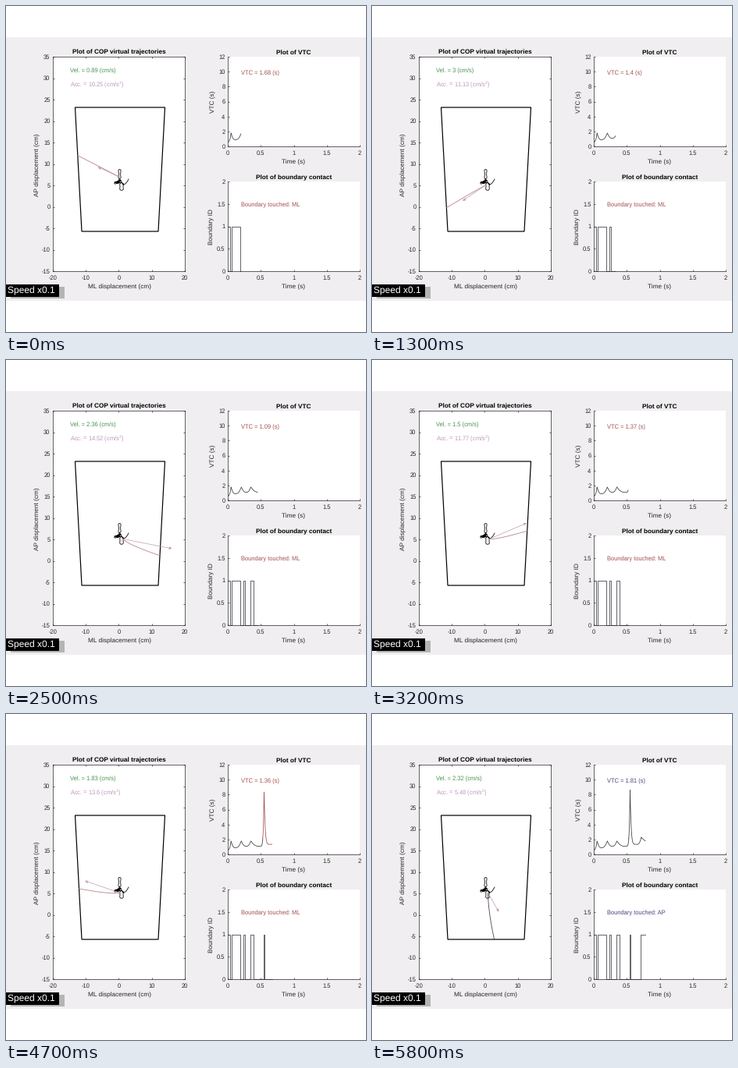
A matplotlib script for the animation above (5.9 s loop, 461 px wide and 418 px high).

```python
import numpy as np
import matplotlib.pyplot as plt
from matplotlib.animation import FuncAnimation
from matplotlib.patches import Polygon, Rectangle

W, H, DPI = 461, 418, 64
PT = 72 / DPI  # points per pixel
FRAMES, T0, DT = 59, 0.2, 0.01
INK, DARK, RED, BLUE = "#262626", "#404048", "#a4504f", "#46467c"
GREEN, PURPLE, ROSE = "#4b9152", "#bd9abb", "#b67f84"

plt.rcParams.update({
    "font.family": "Liberation Sans",
    "mathtext.default": "regular",
    "text.hinting": "none",
    "axes.unicode_minus": False,
    "axes.edgecolor": INK,
    "axes.linewidth": 0.7 * PT,
    "lines.linewidth": 0.8 * PT,
})

fig = plt.figure(figsize=(W / DPI, H / DPI), dpi=DPI, facecolor="white")


def pixel_axes(zorder):
    ax = fig.add_axes([0, 0, 1, 1], zorder=zorder)
    ax.set(xlim=(0, W), ylim=(H, 0))
    ax.axis("off")
    return ax


def panel(left, top, width, height, xticks, yticks, box=False):
    ax = fig.add_axes([left / W, 1 - (top + height) / H, width / W, height / H],
                      zorder=1)
    ax.set_xticks(xticks, [f"{v:g}" for v in xticks])
    ax.set_yticks(yticks, [f"{v:g}" for v in yticks])
    ax.set(xlim=(xticks[0], xticks[-1]), ylim=(yticks[0], yticks[-1]))
    ax.tick_params(direction="in", length=2 * PT, width=0.7 * PT, color=INK,
                   labelcolor=INK, labelsize=7.5 * PT, top=box, right=box)
    ax.tick_params(axis="x", pad=5 * PT)
    ax.tick_params(axis="y", pad=3.5 * PT)
    ax.spines[["top", "right"]].set_visible(box)
    return ax


back = pixel_axes(0)
back.add_patch(Rectangle((0, 40), W, 338, color="#f0eef0", lw=0))
panel(60, 65, 169, 275, np.arange(-20, 21, 10), np.arange(-15, 36, 5), True)
seconds = np.arange(0, 2.1, 0.5)
vtc_ax = panel(284, 65, 169, 115, seconds, np.arange(0, 13, 2))
id_ax = panel(284, 225, 169, 115, seconds, np.arange(0, 2.1, 0.5))
top = pixel_axes(3)


def put(x, y, s="", size=7.5, color=INK, **kw):
    kw = {"va": "baseline", **kw}
    return top.text(x, y, s, size=size * PT, color=color, **kw)


for x, y, s in [(145, 61.5, "Plot of COP virtual trajectories"),
                (368.5, 61.5, "Plot of VTC"),
                (368.5, 222, "Plot of boundary contact")]:
    put(x, y, s, 8.2, "black", weight="bold", ha="center")
for x, y, s in [(145.5, 362, "ML displacement (cm)"),
                (368.5, 202, "Time (s)"), (368.5, 362, "Time (s)")]:
    put(x, y, s, 8.25, ha="center")
for x, y, s in [(40, 203.5, "AP displacement (cm)"), (265.5, 122.5, "VTC (s)"),
                (263.5, 283, "Boundary ID")]:
    put(x, y, s, 8.25, ha="center", va="center", rotation=90)

vel_text = put(82, 85, color=GREEN)
acc_text = put(81.5, 103, color=PURPLE)
vtc_text = put(301, 88)
id_text = put(301, 257.8)

# Speed badge
top.add_patch(Rectangle((6, 359.5), 68.5, 15, color="#b4b4b4", lw=0))
top.add_patch(Rectangle((0, 356.5), 68, 16.5, color="black", lw=0))
put(2, 368.3, "Speed x0.1", 12, "white")

# Support boundary: top, right, bottom, left edges in turn
QUAD = np.array([(88.5, 130), (203.5, 130), (195, 289), (97, 289)])
top.add_patch(Polygon(QUAD, fill=False, ec="black", lw=1.2 * PT))


def loop(cx, cy, rx, ry, turn=0.0):
    a = turn + np.linspace(0, 2 * np.pi, 16)
    return np.c_[cx + rx * np.sin(a) + 0.6 * np.sin(3 * a), cy + ry * np.cos(a)]


# Sway path: a tangle, a loop above, a loop below, a tail to the right
tangle = np.random.default_rng(4).normal((143.5, 225.8), (2.6, 1.1), (16, 2))
s = np.linspace(0, 1, 8)
tail = np.c_[150 + 7 * s, 229 - 7 * s**2]
sway = np.vstack([tangle, loop(145.5, 215.5, 1.7, 6), loop(148, 231.5, 2.6, 4.8, 3), tail])
top.plot(*sway.T, color="black")

# Time to contact: alternating valleys and peaks, starting in a valley
KEY_T = np.array([0, .05, .114, .205, .2815, .35, .471, .55, .6577, .72, .85])
KEY_V = np.array([.6, 1.8, .88, 1.8, 1.08, 1.8, 1.08, 8.6, 1.345, 2.3, 1.655])
TAIL = 0.53


def vtc(t):
    """Flat valleys that sharpen into cusps; taller peaks are sharper."""
    b = np.clip(np.searchsorted(KEY_T, t, "right"), 1, len(KEY_T) - 1)
    lo = np.where(b % 2, b - 1, b)
    hi = 2 * b - 1 - lo
    rise = KEY_V[hi] - KEY_V[lo]
    u = np.abs((t - KEY_T[lo]) / (KEY_T[hi] - KEY_T[lo]))
    return KEY_V[lo] + rise * u**(1.88 + 0.656 * rise)


# Heading of the virtual trajectory: time, degrees
HEADING = np.array([
    (0, 270), (.035, 233), (.055, 122.5), (.12, 90), (.195, 122.5),
    (.2, 152.7), (.235, 122), (.25, 108), (.265, 122), (.33, 210),
    (.39, 304.3), (.52, 372.1), (.5495, 421.2), (.5505, 480.4),
    (.6, 551.5), (.67, 534), (.715, 590.3), (.78, 637.7)]).T

# Readings over time; the arrow is a length and a turn from the heading
READ_T = [.2, .33, .39, .52, .6, .67, .78]
SPEED = [.89, 3, 3.1, 1.5, 1.47, 1.83, 2.32]
ACCEL = [10.25, 11.13, 16.87, 11.77, 12.6, 13.6, 5.48]
REACH = [31, 36, 73, 51, 41, 47, 27]
TURN = [2, 4, 15, 11, -13, -13, 22]


def unit(degrees):
    a = np.radians(degrees)
    return np.array([np.cos(a), -np.sin(a)])


def cross(a, b):
    return a[0] * b[1] - a[1] * b[0]


def cast(t):
    """Start, heading, boundary point and whether an AP edge is hit."""
    heading = np.interp(t, *HEADING)
    d = unit(heading)
    drop = 9.5 * np.exp(-max(t - T0, 0) / 0.04)
    start = np.array([148.3 + 2 * d[0], 229.5 - drop])
    for i, p in enumerate(QUAD):
        edge, gap = QUAD[(i + 1) % 4] - p, p - start
        den = cross(d, edge)
        dist, u = cross(gap, edge) / den, cross(gap, d) / den
        if dist > 0 and -1e-9 <= u <= 1 + 1e-9:
            return start, heading, start + dist * d, i % 2 == 0


# Moments at which the touched boundary changes
grid = np.arange(0, 0.7801, 0.00025)
touch = np.array([cast(t)[3] for t in grid], int)
flip = np.r_[0, np.flatnonzero(np.diff(touch)) + 1]
flip_t, flip_id = grid[flip], touch[flip]

curve, = top.plot([], [])
arrow, = top.plot([], [], color=PURPLE, lw=0.7 * PT)
vtc_line, = vtc_ax.plot([], [], color=DARK)
vtc_tail, = vtc_ax.plot([], [])
id_line, = id_ax.plot([], [], color=DARK, drawstyle="steps-post", clip_on=False)


def arrow_points(start, tip, head=3):
    d = (tip - start) / np.hypot(*(tip - start))
    n = 0.45 * np.array([-d[1], d[0]])
    return np.array([start, tip, tip - head * (d + n), tip, tip - head * (d - n)])


def num(v):
    return f"{round(float(v), 2):g}"


def draw(i):
    t = round(T0 + DT * i, 4)
    start, heading, end, is_ap = cast(t)
    vel, acc, reach, turn = (np.interp(t, READ_T, k)
                             for k in (SPEED, ACCEL, REACH, TURN))
    pull = reach * unit(heading + turn)

    # Ballistic path, bending towards the acceleration
    ctrl = (start + end) / 2 - 0.3 * pull
    u = np.linspace(0, 1, 30)[:, None]
    curve.set_data(*((1 - u)**2 * start + 2 * u * (1 - u) * ctrl + u**2 * end).T)
    curve.set_color(DARK if is_ap else ROSE)
    arrow.set_data(*arrow_points(start, start + pull).T)

    ts = np.linspace(0, min(t, TAIL), 200)
    vtc_line.set_data(ts, vtc(ts))
    ts = np.linspace(TAIL, max(t, TAIL), 101)
    vtc_tail.set_data(ts, vtc(ts))
    vtc_tail.set_color(DARK if is_ap else RED)
    past = flip_t <= t
    ids = flip_id[past]
    id_line.set_data(np.r_[flip_t[past], t], np.r_[ids, ids[-1]])

    vel_text.set_text(f"Vel. = {num(vel)} (cm/s)")
    acc_text.set_text(f"Acc. = {num(acc)} (cm/s$^2$)")
    vtc_text.set_text(f"VTC = {num(vtc(t))} (s)")
    id_text.set_text(f"Boundary touched: {'AP' if is_ap else 'ML'}")
    for text in (vtc_text, id_text):
        text.set_color(BLUE if is_ap else RED)
    return curve, arrow, vtc_line, vtc_tail, id_line


anim = FuncAnimation(fig, draw, frames=FRAMES, interval=100, repeat=True,
                     repeat_delay=0, blit=False)
plt.show()
```
